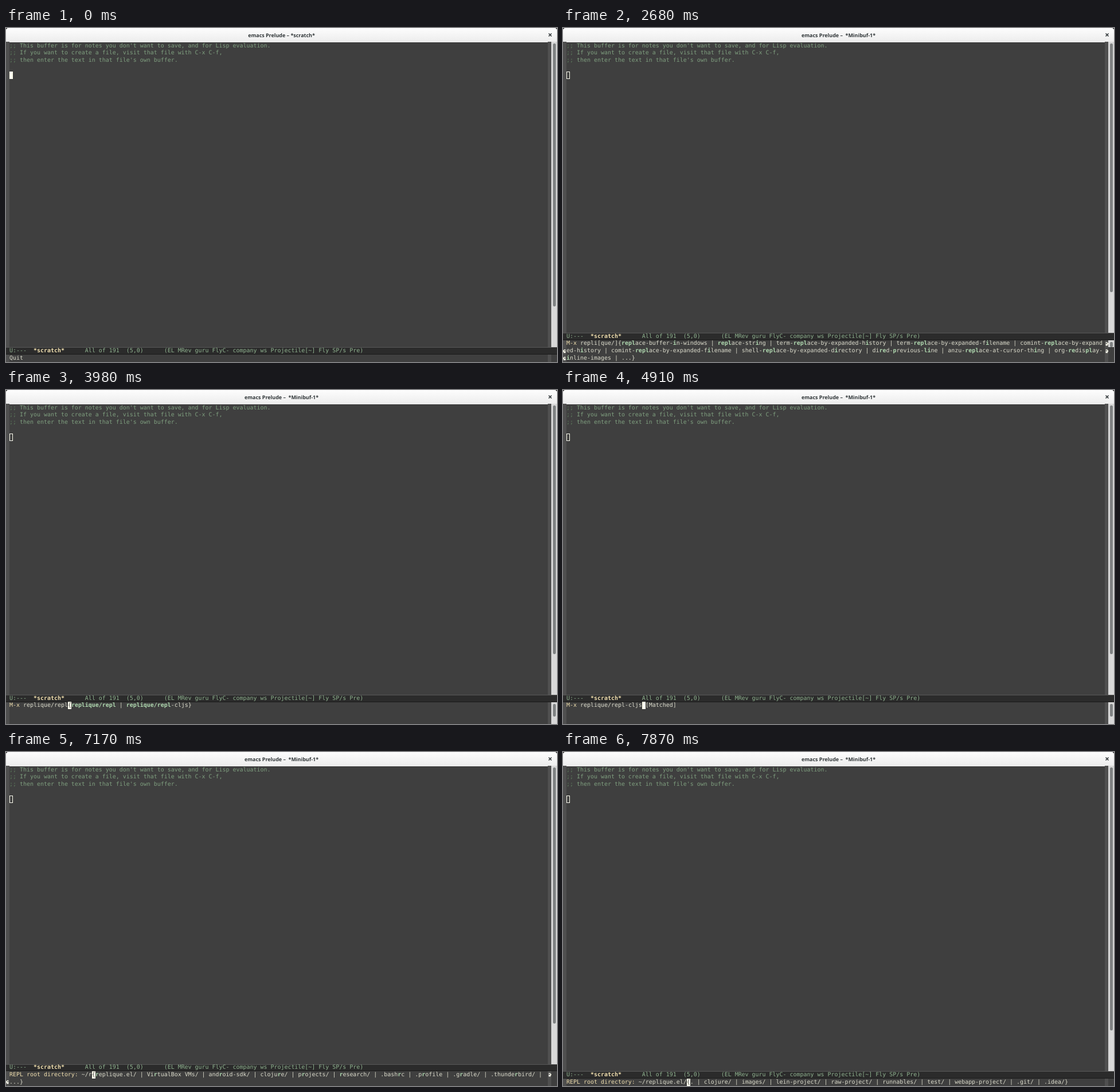
Recreate the animation shown at these times as an HTML page. Size 961 by 583 pixels, loop 8000 ms.

```html
<!DOCTYPE html>
<html lang="en">
<head>
<meta charset="utf-8">
<title>Editor session</title>
<style>
  html, body { margin: 0; width: 100%; height: 100%; overflow: hidden; background: #000; }
  #stage {
    --row: 12.75px;
    --drop: .75px; /* lowers text within its row */
    --rows: 1;
    --modeline: calc(582.75px - (var(--rows) + 1) * var(--row));
    position: relative; width: 961px; height: 583px; overflow: hidden;
    font: 9.967px/12.75px "DejaVu Sans Mono", monospace;
    text-rendering: geometricPrecision; white-space: pre; color: #dcdccc;
  }
  #stage > * { position: absolute; box-sizing: border-box; }
  #bar {
    left: 0; top: 0; width: 961px; height: 24.5px; border-radius: 4px 4px 0 0;
    background: linear-gradient(#fdfdfd, #ececec);
    font: bold 8.95px/25px "Open Sans", sans-serif; text-align: center; color: #2e3436;
  }
  #close { left: 946px; top: 9px; width: 6px; height: 6px; stroke: #2e3436; stroke-width: 1.5; }
  #frame { left: 0; top: 24px; width: 961px; height: 559px; background: #3f3f3f; }
  .fringe { top: 24px; width: 6px; height: 559px; background: #4f4f4f; }
  #notes { left: 6px; top: calc(24.75px + var(--drop)); color: #7f9f7f; }
  #notes s { color: #5f7f5f; text-decoration: none; }
  #point { left: 6px; top: 75.75px; width: 6px; height: var(--row); border: .9px solid #ffffef; }
  #point.active { background: #ffffef; }
  .track { left: 951px; width: 10px; background: #d8d8d8; }
  .thumb { left: 954px; width: 4.5px; border-radius: 2.25px; background: #7f8283; }
  #track { top: 24px; height: calc(var(--modeline) - 24px); }
  #thumb { top: 27px; height: calc(var(--modeline) - 98px); }
  #miniTrack { top: 544.5px; }
  #miniThumb { top: 547.5px; }
  #modeline {
    left: 0; top: var(--modeline); width: 961px; height: var(--row); padding-top: var(--drop);
    background: #2b2b2b; color: #8fb28f;
    box-shadow: inset 0 .75px #666, inset 0 -.75px #151515;
  }
  #modeline b { color: #f0dfaf; }
  #mini {
    left: 6px; top: calc(var(--modeline) + var(--row) + var(--drop)); width: 938px;
    white-space: break-spaces; line-break: anywhere;
  }
  #mini i { font-style: normal; color: #f0dfaf; }
  #mini b { color: #afd8af; }
  #mini u {
    display: inline-block; vertical-align: top; height: calc(var(--row) - var(--drop));
    text-decoration: none; background: #ffffef; color: #3f3f3f;
    box-shadow: 0 calc(0px - var(--drop)) #ffffef;
  }
  #arrows { left: 0; top: calc(var(--modeline) + var(--row)); width: 961px; height: 39px; fill: #ffffef; }
</style>
</head>
<body>
<div id="stage">
  <div id="frame"></div>
  <div id="bar"></div>
  <svg id="close" viewBox="0 0 6 6"><path d="M.5 .5l5 5m0-5l-5 5"/></svg>
  <div class="fringe" style="left:0"></div>
  <div class="fringe" style="left:945px"></div>
  <div id="notes"><s>;; </s>This buffer is for notes you don't want to save, and for Lisp evaluation.
<s>;; </s>If you want to create a file, visit that file with C-x C-f,
<s>;; </s>then enter the text in that file's own buffer.</div>
  <div id="point"></div>
  <div id="track" class="track"></div>
  <div id="thumb" class="thumb"></div>
  <div id="miniTrack" class="track"></div>
  <div id="miniThumb" class="thumb"></div>
  <div id="modeline"> U:---  <b>*scratch*</b>      All of 191  (5,0)      (EL MRev guru FlyC- company ws Projectile[~] Fly SP/s Pre)</div>
  <div id="mini"></div>
  <svg id="arrows"></svg>
</div>
<script>
const LOOP = 8000, ROW = 12.75, COLUMNS = 156;
const $ = id => document.getElementById(id);

// Emphasise each part of the typed pattern in turn.
function mark(name, parts) {
  let from = 0, out = "";
  for (const part of parts ? parts.split(" ") : []) {
    const at = name.indexOf(part, from);
    if (at < 0) continue;
    out += name.slice(from, at) + `<b>${part}</b>`;
    from = at + part.length;
  }
  return out + name.slice(from);
}
const choices = (names, parts) => "{" + names.map(name => mark(name, parts)).join(" | ") + "}";
const matched = (name, parts) => `[${mark(name, parts)}] [Matched]`;
const prompt = (label, typed, tail) =>
  `<i>${label}</i>${typed}<u>${tail[0] || " "}</u>${tail.slice(1)}`;
const mx = (typed, tail) => prompt("M-x ", typed, tail);
const root = (typed, tail) => prompt("REPL root directory: ", "~/" + typed, tail);
const replique = names => names.split(" ").map(name => name === "..." ? name : "replique/" + name);

const recent = ["replique/repl-cljs", "replique/repl", "indent-region", "visual-line-mode",
  "customize-themes", "load-theme", "toggle-debug-on-error", "epresent-run",
  "replique/load-file-generic", "orvy/find-elisp-thing", "..."];
const onR = ["replique/repl-cljs", "replique/repl", "indent-region", "toggle-debug-on-error",
  "epresent-run", "replique/load-file-generic", "rename-buffer", "revert-buffer",
  "replace-string", "read-only-mode", "..."];
const onRe = ["replique/repl-cljs", "replique/repl", "indent-region", "epresent-run",
  "replique/load-file-generic", "rename-buffer", "revert-buffer", "replace-string",
  "recover-this-file", "reposition-window", "..."];
const onRep = ["replique/repl-cljs", "replique/repl", "epresent-run", "replique/load-file-generic",
  "replace-string", "replace-regexp", "reposition-window", "query-replace", "replace-rectangle", "..."];
const onRepli = ["replace-buffer-in-windows", "replace-string", "term-replace-by-expanded-history",
  "term-replace-by-expanded-filename", "comint-replace-by-expanded-history",
  "comint-replace-by-expanded-filename", "shell-replace-by-expanded-directory",
  "dired-previous-line", "anzu-replace-at-cursor-thing", "org-redisplay-inline-images", "..."];
const commands = replique("repl-cljs repl load-file-generic mode switch-ns eval-defn eval-region restart in-ns-generic eval-last-sexp ...");
const replCommands = replique("repl-cljs repl browser-repl remove-repl reset-all-repls cljs-repl-connection");
const home = [".", "Desktop/", "Documents/", "Downloads/", "Nightcode/", "Snapshots/",
  "VirtualBox VMs/", "android-sdk/", "bin/", "clojure/", "..."];
const homeOnR = ["replique.el/", "VirtualBox VMs/", "android-sdk/", "clojure/", "projects/",
  "research/", ".bashrc", ".profile", ".gradle/", ".thunderbird/", "..."];
const project = [".", "clojure/", "images/", "lein-project/", "raw-project/", "runnables/",
  "test/", "webapp-project/", ".git/", ".idea/"];

const repli = choices(onRepli, "re p l i");
const partial = (typed, rest) => mx(typed, `[${rest}]` + choices(commands, typed));
const cljs = typed => mx(typed, matched("replique/repl-cljs", typed));

// Start time, minibuffer content, minibuffer height in rows.
const states = [
  [0, "Quit", 1],
  [1480, mx("", choices(recent)), 2],
  [1540, mx("", choices(recent)), 2],
  [2310, mx("r", choices(onR, "r")), 2],
  [2360, mx("re", choices(onRe, "re")), 2],
  [2540, mx("rep", choices(onRep, "re p")), 2],
  [2680, "<i>M-x </i>repli[que/]" + repli, 3],
  [2730, partial("repli", "que/"), 3],
  [2980, partial("repliq", "ue/"), 3],
  [3020, partial("repliqu", "e/"), 3],
  [3290, partial("replique", "/"), 3],
  [3450, mx("replique/", choices(commands, "replique/")), 3],
  [3630, mx("replique/r", choices([...replCommands, ...replique("restart ...")], "replique/ r")), 3],
  [3700, mx("replique/re", choices(replCommands, "replique/ re")), 3],
  [3770, mx("replique/rep", choices(replCommands, "replique/ rep")), 3],
  [3980, mx("replique/repl", choices(replique("repl repl-cljs"), "replique/repl")), 3],
  [4160, cljs("replique/repl-"), 3],
  [4330, cljs("replique/repl-c"), 3],
  [4580, cljs("replique/repl-cl"), 3],
  [4910, mx("replique/repl-cljs", " [Matched]"), 3],
  [5690, "", 1],
  [5750, root("", ""), 1],
  [5800, root("", choices(home)), 1],
  [7170, root("r", choices(homeOnR, "r")), 2],
  [7320, root("re", choices(homeOnR.filter(name => /re|\.\.\./.test(name)), "re")), 2],
  [7400, root("rep", matched("replique.el/", "rep")), 2],
  [7630, root("replique.el/", " [Matched]"), 2],
  [7710, root("replique.el/", ""), 1],
  [7870, root("replique.el/", choices(project)), 1]
];

const hook = "M2 0H6V2H2V3H3V4H5V3H6V8H1V7H2V6H1V5H0V2H1V1H2Z";
function wrapArrows(length) {
  let out = "";
  for (let row = 1; row * COLUMNS < length; row++) {
    const y = row * ROW + 3.4;
    out += `<path d="${hook}" transform="translate(0 ${y}) scale(.75)"/>` +
           `<path d="${hook}" transform="translate(951 ${y - ROW}) scale(-.75 .75)"/>`;
  }
  return out;
}

function show([time, html, rows]) {
  const settling = time < 2730; // the tall minibuffer first gets a one-row scroll bar
  $("stage").style.setProperty("--rows", rows);
  $("bar").textContent = "emacs Prelude – " + (time < 1540 ? "*scratch*" : "\u00a0*Minibuf-1*");
  $("point").className = time < 1480 ? "active" : "";
  $("mini").innerHTML = html;
  $("arrows").innerHTML = wrapArrows($("mini").textContent.length);
  $("miniTrack").hidden = $("miniThumb").hidden = rows < 3;
  $("miniTrack").style.height = settling ? ROW + "px" : "38.5px";
  $("miniThumb").style.height = settling ? "9.5px" : "22.5px";
}

let current;
function tick() {
  const time = performance.now() % LOOP;
  const state = states.findLast(([start]) => start <= time);
  if (state !== current) show(current = state);
  requestAnimationFrame(tick);
}
tick();
</script>
</body>
</html>
```
